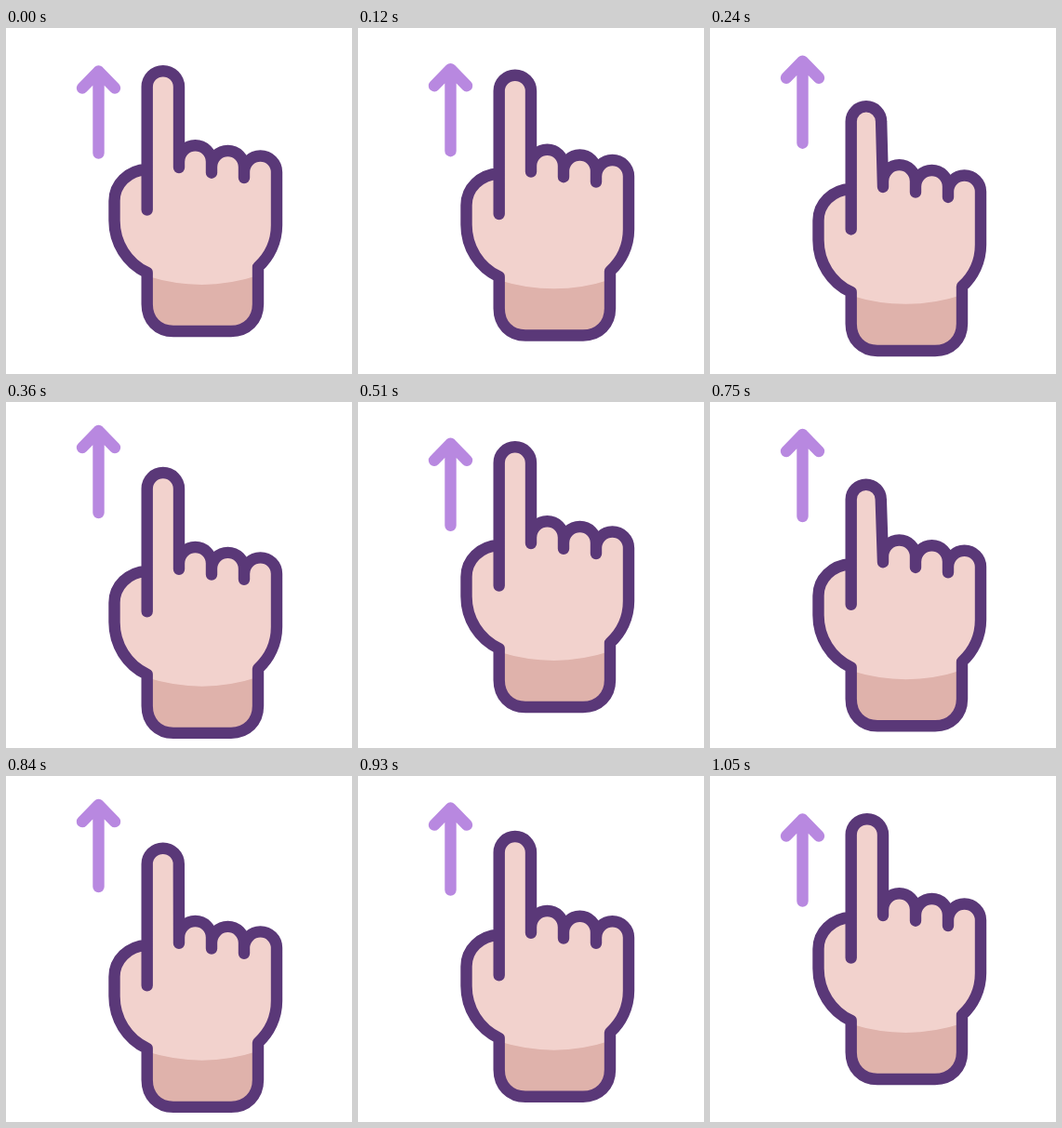
These frames come from a looping animation (372x372 px, 1.11 s). An HTML page with a canvas:

```html
<!DOCTYPE html>
<html lang="en">
<head>
<meta charset="utf-8">
<title>Swipe up</title>
<style>
  html, body { margin: 0; width: 100%; height: 100%; overflow: hidden; background: #fff; }
  canvas { display: block; width: 372px; height: 372px; }
</style>
</head>
<body>
<canvas id="stage" width="372" height="372"></canvas>
<script>
const ctx = document.getElementById('stage').getContext('2d');

const LOOP = 1110, STEP = 30, START = 45, CYCLE = 500;
const LINE = '#5a3878', SKIN = '#f2d2cd', CUFF = '#dfb2ab', ARROW = '#b888e0';

// Smooth 0..1 ramp between times a and b
function ramp(t, a, b) {
  const u = Math.min(1, Math.max(0, (t - a) / (b - a)));
  return u * u * (3 - 2 * u);
}

function pose(time) {
  let t = time;
  if (t >= START + CYCLE) t = Math.min(t - CYCLE, START + CYCLE);
  const down = ramp(t, START, 352);
  return {
    hand: 30 * (down - ramp(t, 352, 540)),
    arrow: -15.5 * (down - ramp(t, 378, 545)),
    bend: 26 * (ramp(t, 170, 285) - ramp(t, 285, 350))
  };
}

function handPath(bend) {
  const left = 151.7, right = 186, tipRight = right - bend * 0.11;
  const r = (tipRight - left) / 2, tipY = 46.2 + bend + r;
  const p = new Path2D();

  // index finger
  p.moveTo(left, 195.5);
  p.lineTo(left, tipY);
  p.arc(left + r, tipY, r, Math.PI, 0);
  p.lineTo(right, 150);

  // knuckles
  const kr = 17.5;
  [143.7, 149.5, 155].forEach((y, i) => {
    const x = right + 35 * i;
    p.lineTo(x, y);
    p.arc(x + kr, y, kr, Math.PI, 0);
    if (i < 2) p.lineTo(x + 35, y + 12 - i * 0.5);
  });

  // palm edge, wrist, thumb
  p.lineTo(291, 212);
  p.bezierCurveTo(291, 230, 283, 246, 271, 257);
  p.lineTo(271, 297);
  p.bezierCurveTo(271, 314, 259, 326, 242, 326);
  p.lineTo(180, 326);
  p.bezierCurveTo(163, 326, 151.7, 314, 151.7, 297);
  p.lineTo(151.7, 263);
  p.bezierCurveTo(130, 253, 116.5, 231, 116.5, 207);
  p.lineTo(116.5, 186);
  p.bezierCurveTo(116.5, 168, 131, 153, 151.7, 152);
  return p;
}

function drawHand(y, bend) {
  const path = handPath(bend);
  ctx.save();
  ctx.translate(0, y);
  ctx.fillStyle = SKIN;
  ctx.fill(path);

  ctx.save();
  ctx.clip(path);
  ctx.fillStyle = CUFF;
  ctx.beginPath();
  ctx.moveTo(151, 266.5);
  ctx.quadraticCurveTo(212, 285.5, 271, 266);
  ctx.lineTo(271, 330);
  ctx.lineTo(151, 330);
  ctx.fill();
  ctx.restore();

  ctx.strokeStyle = LINE;
  ctx.stroke(path);
  ctx.restore();
}

function drawArrow(y) {
  ctx.save();
  ctx.translate(99.5, y);
  ctx.strokeStyle = ARROW;
  ctx.beginPath();
  ctx.moveTo(-17.5, 64.5);
  ctx.lineTo(0, 46.5);
  ctx.lineTo(17.5, 64.5);
  ctx.moveTo(0, 46.5);
  ctx.lineTo(0, 134.5);
  ctx.stroke();
  ctx.restore();
}

function draw(now) {
  const time = Math.floor((now % LOOP) / STEP) * STEP;
  const { hand, arrow, bend } = pose(time);
  ctx.fillStyle = '#fff';
  ctx.fillRect(0, 0, 372, 372);
  ctx.lineWidth = 12.4;
  ctx.lineCap = ctx.lineJoin = 'round';
  drawArrow(arrow);
  drawHand(hand, bend);
}

const begin = performance.now();
function tick() {
  draw(performance.now() - begin);
  requestAnimationFrame(tick);
}
tick();
</script>
</body>
</html>
```
